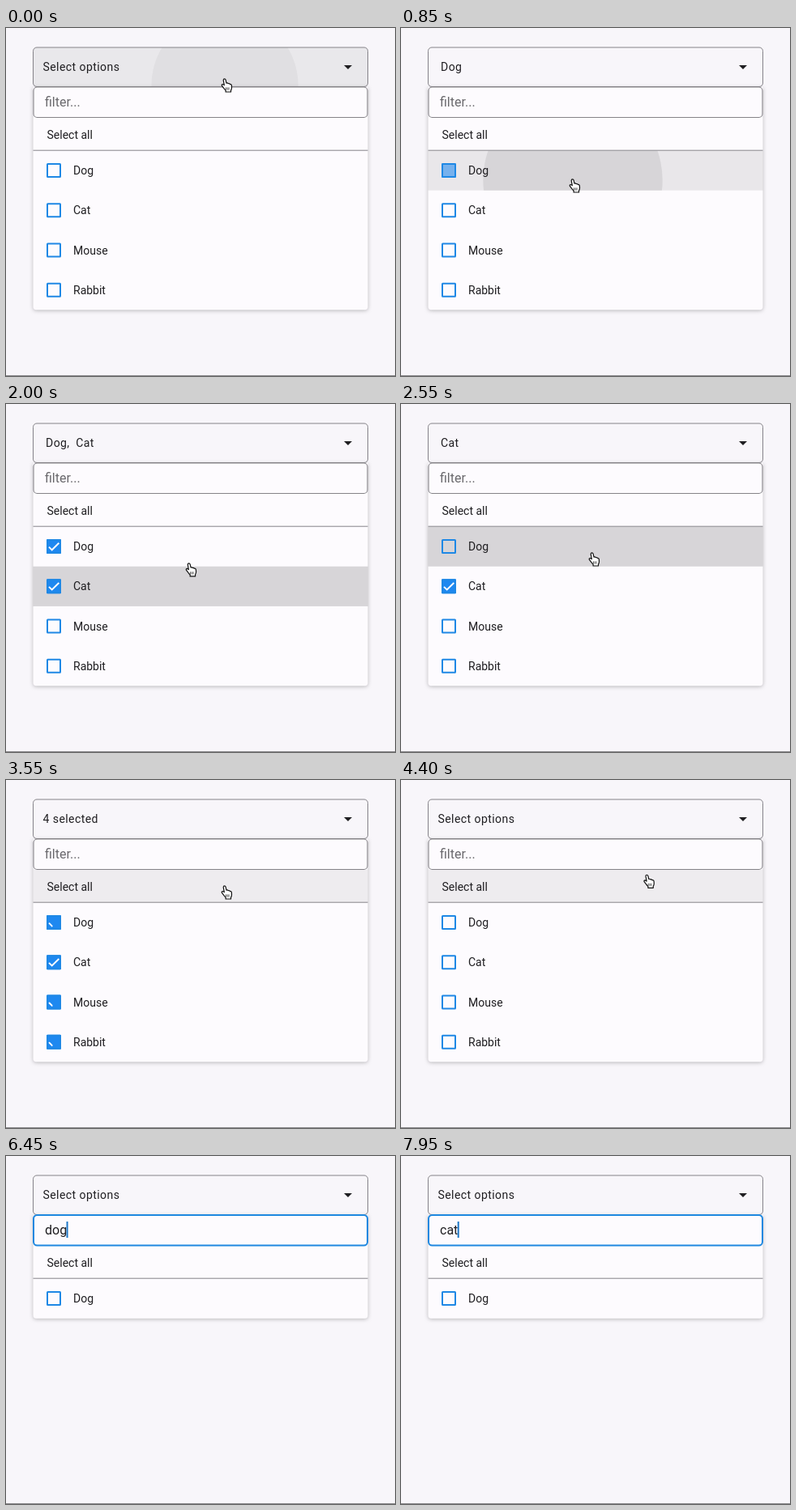
An HTML page for the animation above (8 s loop, 480 by 430 pixels).

```html
<!DOCTYPE html>
<html lang="en">
<head>
<meta charset="utf-8">
<title>Multi-select with filter</title>
<style>
  html, body { margin: 0; width: 100%; height: 100%; overflow: hidden; background: #f8f6fa; }
  svg { display: block; width: 480px; height: 430px; }
  text { font: 14px Roboto, Arial, sans-serif; fill: #1f1e21; }
  .value { letter-spacing: .44px; }
  .field { font-size: 16px; }
  .hint { fill: #69686c; }
  #panel { fill: #fdfbfe; filter: drop-shadow(0 1.5px 2.5px rgba(0, 0, 0, .26)); }
  .line { fill: none; stroke: #858388; }
  .hand { fill: #fff; stroke: #111; stroke-width: 1.2; stroke-linejoin: round; }
</style>
</head>
<body>
<svg viewBox="0 0 480 430">
  <defs>
    <clipPath id="headClip"><rect x="33.5" y="24" width="413" height="48.5" rx="4.5"/></clipPath>
  </defs>
  <rect width="480" height="430" fill="#f8f6fa"/>
  <rect y="429" width="480" height="1" fill="#8b8a8d"/>

  <g clip-path="url(#headClip)">
    <rect id="headHover" x="33" y="24" width="414" height="49" opacity=".06"/>
    <circle id="headRipple" cx="270" cy="71" r="90"/>
  </g>
  <path id="panel"/>
  <rect class="line" x="33.5" y="24" width="413" height="48.5" rx="4.5"/>
  <text id="value" class="value" y="53"></text>
  <text id="extra" class="value" x="86.2" y="53">Cat</text>
  <path d="M417 46h10l-5 5z" fill="#1f1e21"/>

  <rect id="allHover" x="33.5" y="110.5" width="413" height="40.5" opacity=".06"/>
  <text x="50.5" y="136.5">Select all</text>
  <g id="rows"></g>
  <path class="line" d="M33.5 151.2h413"/>

  <rect id="box" x="34" y="73" width="412" height="37.5" rx="4.5" fill="#fdfbfe"/>
  <text id="typed" class="field" x="48" y="97"></text>
  <rect id="caret" y="81" width="2" height="20" fill="#1e78c8"/>

  <g id="cursor">
    <g id="hand">
      <path class="hand" d="M-4.8-6.6q0-1.5 1.4-1.5 1.2 0 1.5 1.3l.9 3.9q1.6-.5 2.1.5 1.6-.4 2.1.7 1.8-.2 2.1 1.3l.2 2.8q0 2-1 3.4v2.2h-6.4v-1.9q-1.6-1.4-2.4-2.8l-2.4-3.1q-.4-1.5.9-1.7 1.1 0 2.1 1.2z"/>
      <path d="M.2 2.4v3.2M2 2.4v3.2M-1.6 2.4v3.2" stroke="#111" stroke-width=".7"/>
    </g>
    <path id="beam" d="M-3.4-7.6q2.9 0 3.4 1.5 .5-1.5 3.4-1.5M0-6.1V6.5M-3.4 8q2.9 0 3.4-1.5 .5 1.5 3.4 1.5M-1.6 2.6h3.2" fill="none" stroke="#151515" stroke-width="1.4"/>
  </g>
</svg>
<script>
const LOOP = 8000, TOP = 151.5, ROW = 49.2;
const $ = id => document.getElementById(id);
const clamp = v => Math.max(0, Math.min(1, v));
const set = (el, attrs) => { for (const k in attrs) el.setAttribute(k, attrs[k]); };
const show = (el, on) => { el.style.display = on ? '' : 'none'; };

// Spans of time during which each option is checked.
const options = [
  { name: 'Dog', on: [[800, 2250], [3400, 3900]] },
  { name: 'Cat', on: [[1550, 3900]] },
  { name: 'Mouse', on: [[3400, 3900]] },
  { name: 'Rabbit', on: [[3400, 3900]] }
];
// Focus by row: start, end, row, press x, press y
const focuses = [[800, 1550, 0, 212, 188], [1550, 2250, 1, 198, 225], [2250, 2900, 0, 236, 185]];
// Pointer path: time, x, y
const path = [[250, 273, 71], [600, 215, 195], [930, 215, 195], [1200, 201, 232],
  [1850, 201, 232], [2000, 229, 205], [2150, 239, 192], [2600, 239, 192], [3080, 273, 139],
  [4100, 273, 139], [4350, 319, 130], [4700, 235, 98], [4750, 234, 95]];
const values = [[0, 'Select options'], [800, 'Dog'], [1550, 'Dog,'], [2250, 'Cat'],
  [3400, '4 selected'], [3900, 'Select options']];
const typing = [[0, ''], [5500, 'd'], [5800, 'do'], [6100, 'dog'], [6800, 'do'],
  [6950, 'd'], [7100, ''], [7450, 'c'], [7650, 'ca'], [7800, 'cat']];

const latest = (steps, t) => steps.filter(s => s[0] <= t).pop()[1];

function pointer(t) {
  const i = path.findIndex(p => p[0] > t);
  if (i < 0) return path[path.length - 1].slice(1);
  if (!i) return path[0].slice(1);
  const [t0, x0, y0] = path[i - 1], [t1, x1, y1] = path[i];
  const k = (t - t0) / (t1 - t0);
  return [x0 + (x1 - x0) * k, y0 + (y1 - y0) * k];
}

$('rows').innerHTML = options.map((o, i) => {
  const y = TOP + i * ROW, c = y + 24.6;
  return `<g><clipPath id="clip${i}"><rect x="33.5" y="${y}" width="413" height="${ROW}"/></clipPath>
    <rect class="hover" x="33.5" y="${y}" width="413" height="${ROW}" opacity=".08"/>
    <circle class="focus" clip-path="url(#clip${i})" opacity=".08"/>
    <rect class="fill" x="50" y="${c - 9}" width="18" height="18" rx="1" fill="#1e88f0"/>
    <rect x="51" y="${c - 8}" width="16" height="16" rx=".5" fill="none" stroke="#1e88e5" stroke-width="2"/>
    <path class="tick" d="M53 ${c + .5}l3.7 3.7 8.6-8.5" pathLength="1" stroke-dasharray="1 2" fill="none" stroke="#fff" stroke-width="1.9"/>
    <text x="83" y="${c + 5}">${o.name}</text></g>`;
}).join('');
const rows = [...$('rows').children].map(g => ({
  g, hover: g.querySelector('.hover'), focus: g.querySelector('.focus'),
  fill: g.querySelector('.fill'), tick: g.querySelector('.tick')
}));

function drawRow(r, i, t, spot) {
  show(r.g, !i || t < 6400);
  show(r.hover, t < 5500 && spot >= TOP + i * ROW && spot < TOP + (i + 1) * ROW);

  const f = focuses.find(f => f[2] === i && t >= f[0] && t < f[1]);
  show(r.focus, f);
  if (f) set(r.focus, { cx: f[3], cy: f[4], r: 20 + 400 * clamp((t - f[0]) / 225) });

  const span = options[i].on.filter(s => s[0] <= t).pop();
  const on = span ? clamp((t - span[0]) / 90) : 0;
  const off = span ? clamp((t - span[1]) / 90) : 0;
  const drawn = span ? clamp((t - span[0] - 100) / 150) : 0;
  set(r.fill, { opacity: on * (1 - off) });
  set(r.tick, { 'stroke-dashoffset': 1 - drawn, opacity: drawn ? 1 - off : 0 });
}

function render(t) {
  const [x, y] = pointer(t), spot = y - 4;
  const inField = spot < 111 && t > 4000;

  set($('headHover'), { opacity: .06 * (1 - clamp((t - 300) / 300)) });
  set($('headRipple'), { r: 90 + 130 * clamp(t / 225), opacity: .04 * (1 - clamp((t - 200) / 250)) });

  const value = latest(values, t);
  $('value').textContent = value;
  set($('value'), { x: /^(Dog|Cat)/.test(value) ? 49 : 45.5 });
  show($('extra'), value === 'Dog,');

  const bottom = t < 6400 ? 348.3 : 200.7;
  set($('panel'), { d: `M33.5 73H446.5V${bottom - 4}q0 4-4 4H37.5q-4 0-4-4z` });
  show($('allHover'), spot >= 111 && spot < TOP);
  rows.forEach((r, i) => drawRow(r, i, t, spot));

  const focused = t >= 4900, text = latest(typing, t), field = $('typed');
  set($('box'), { stroke: focused ? '#1e88e0' : '#858388', 'stroke-width': focused ? 2 : 1.1 });
  field.textContent = text || 'filter...';
  field.classList.toggle('hint', !text);
  show($('caret'), focused);
  set($('caret'), { x: 47.4 + (text ? field.getComputedTextLength() : 0) });

  show($('cursor'), t < 5500);
  set($('cursor'), { transform: `translate(${x} ${y})` });
  show($('hand'), !inField);
  show($('beam'), inField);
}

const start = performance.now();
function tick() {
  render((performance.now() - start) % LOOP);
  requestAnimationFrame(tick);
}
tick();
</script>
</body>
</html>
```
